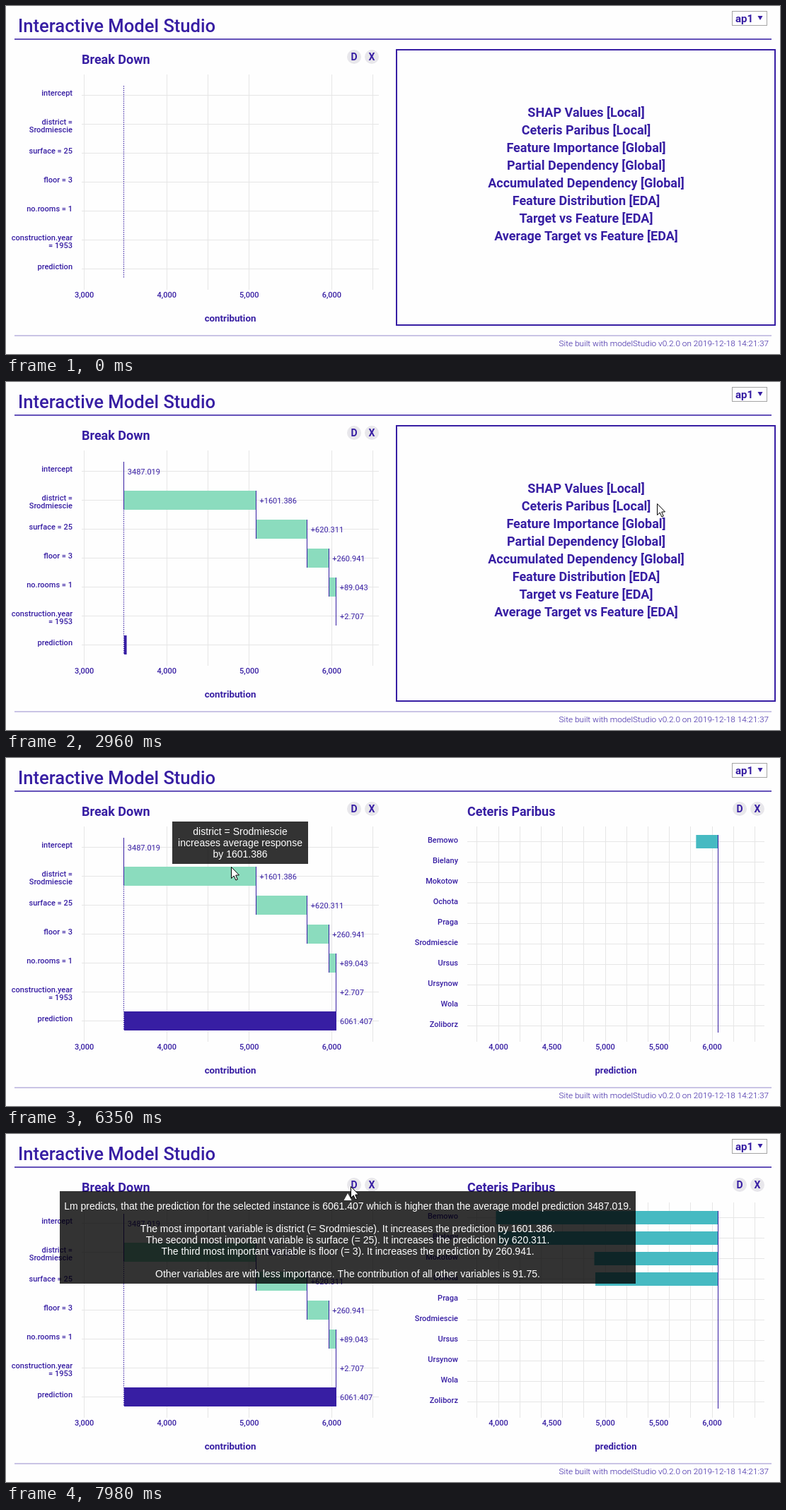
Recreate the animation shown at these times as an HTML page with a canvas. Size 1094 by 493 pixels, loop 8000 ms.

```html
<!DOCTYPE html>
<html lang="en">
<head>
<meta charset="utf-8">
<title>Interactive Model Studio</title>
<style>
html, body { margin: 0; width: 100%; height: 100%; overflow: hidden; background: #fefefe; }
canvas { display: block; }
</style>
</head>
<body>
<canvas id="stage" width="1094" height="493"></canvas>
<script>
const ctx = document.getElementById('stage').getContext('2d');
const LOOP = 8000, INK = '#371ea3', GREEN = '#8bdcbe', TEAL = '#46bac2', GRID = '#e6e6e6';
const MENU = ['SHAP Values [Local]', 'Ceteris Paribus [Local]', 'Feature Importance [Global]',
  'Partial Dependency [Global]', 'Accumulated Dependency [Global]', 'Feature Distribution [EDA]',
  'Target vs Feature [EDA]', 'Average Target vs Feature [EDA]'];
const ROWS = [['intercept'], ['district =', 'Srodmiescie'], ['surface = 25'], ['floor = 3'],
  ['no.rooms = 1'], ['construction.year', '= 1953'], ['prediction']];
const BASE = 3487.019, PREDICTION = 6061.407;
const STEPS = [1601.386, 620.311, 260.941, 89.043, 2.707];
const DISTRICTS = ['Bemowo', 'Bielany', 'Mokotow', 'Ochota', 'Praga', 'Srodmiescie',
  'Ursus', 'Ursynow', 'Wola', 'Zoliborz'];
const DISTRICT_LEFT = [692.5, 695, 831.5, 833];
const HOVER_TIP = ['district = Srodmiescie', 'increases average response', 'by 1601.386'];
const SUMMARY = [
  'Lm predicts, that the prediction for the selected instance is 6061.407 which is higher than the average model prediction 3487.019.',
  '',
  'The most important variable is district (= Srodmiescie). It increases the prediction by 1601.386.',
  'The second most important variable is surface (= 25). It increases the prediction by 620.311.',
  'The third most important variable is floor (= 3). It increases the prediction by 260.941.',
  '',
  'Other variables are with less importance. The contribution of all other variables is 91.75.'];
// pointer keyframes: time, x, y
const PATH = [[430, 1080, 77], [800, 1007, 105], [1100, 994, 109], [1620, 974, 127], [2440, 970, 136],
  [2960, 920, 172], [3300, 899, 176], [3380, 897, 177], [4230, 897, 177], [4470, 796, 191],
  [4850, 590, 165], [5280, 393, 118], [5480, 326, 164], [5570, 330, 158], [5890, 330, 158],
  [6010, 318, 154], [6650, 318, 154], [7000, 339, 131], [7150, 339, 131], [7720, 484, 76],
  [7900, 484, 74], [7980, 487, 74]];

const clamp = v => Math.max(0, Math.min(1, v));
const cubic = p => p < .5 ? 4 * p ** 3 : 1 - 4 * (1 - p) ** 3;
const progress = (t, start, span) => cubic(clamp((t - start) / span));
const num = v => v.toLocaleString('en-US');

function text(s, x, y, size = 11, weight = 500, align = 'left', color = INK, family = 'Roboto') {
  ctx.font = `${weight} ${size}px ${family}, sans-serif`;
  ctx.textAlign = align;
  ctx.fillStyle = color;
  ctx.fillText(s, x, y);
}
function rect(x, y, w, h, color) {
  ctx.fillStyle = color;
  ctx.fillRect(x, y, w, h);
}
function shape(points, fill, stroke) {
  ctx.beginPath();
  points.forEach(([x, y]) => ctx.lineTo(x, y));
  ctx.closePath();
  ctx.fillStyle = fill;
  ctx.fill();
  if (stroke) {
    ctx.strokeStyle = stroke;
    ctx.lineWidth = 1;
    ctx.stroke();
  }
}
function disc(x, y, r, color) {
  ctx.beginPath();
  ctx.arc(x, y, r, 0, 7);
  ctx.fillStyle = color;
  ctx.fill();
}
const hline = (x, y, w, color = GRID) => rect(x, Math.round(y), w, 1, color);
const vline = (x, y, h, color = GRID) => rect(Math.floor(x), y, 1, h, color);

function plotHead(title, x) {
  text(title, x, 82, 18, 700);
  [['D', 385], ['X', 410]].forEach(([s, dx]) => {
    disc(x + dx, 72, 10, '#e8e7eb');
    text(s, x + dx, 77, 14, 700, 'center');
  });
}

function page() {
  rect(0, 0, 1094, 493, '#fefefe');
  text('Interactive Model Studio', 17, 37, 25.6, 500);
  rect(12, 46, 1070, 2, '#6452b9');
  rect(12, 466, 1070, 2, '#c9c4e5');
  text('Site built with modelStudio v0.2.0 on 2019-12-18 14:21:37', 1078, 482, 11.8, 300, 'right');
  ctx.strokeStyle = '#a5a5a5';
  ctx.lineWidth = 1;
  ctx.strokeRect(1026.5, 7.5, 49, 20);
  text('ap1', 1031, 23, 15, 700);
  shape([[1062.5, 14], [1069.5, 14], [1066, 20]], INK);
}

function breakDown(t) {
  const START = -68, SPAN = 493;
  const scale = v => 110 + .1166 * (v - 3000);
  const done = i => t >= START + (i + 1) * SPAN;
  const grow = i => progress(t, START + i * SPAN, SPAN);
  const top = i => 113 + 41 * i;

  plotHead('Break Down', 107);
  [3000, 4000, 4500, 5000, 6000, 6500].forEach(v => vline(scale(v) + .4, 97, 305));
  ROWS.forEach((lines, i) => {
    hline(107, top(i) + 13, 420);
    lines.forEach((s, k) => text(s, 94, top(i) + 14 + 11 * k, 11, 500, 'right'));
  });
  [3000, 4000, 5000, 6000].forEach(v => text(num(v), scale(v) + .6, 413, 11, 500, 'center'));
  text('contribution', 317, 447, 13.3, 700, 'center');
  for (let y = 113; y < 385; y += 3) rect(166, y, 1, 1.5, INK);

  // Each connector drops to the next row while that row's bar grows.
  const connector = (i, x) => vline(x, top(i), 68 * grow(i + 1), INK);
  let from = BASE;
  if (done(0)) text('3487.019', scale(BASE) + 5, 131, 11, 400);
  STEPS.forEach((d, k) => {
    const i = k + 1, x = scale(from);
    rect(x, top(i), (scale(from + d) - x) * grow(i), 27, GREEN);
    from += d;
    if (done(i)) text('+' + d, scale(from) + 5, top(i) + 18, 11, 400);
  });
  rect(167, top(6), (scale(PREDICTION) - 167) * grow(6), 27, INK);
  if (done(6)) text(PREDICTION, scale(PREDICTION) + 5, top(6) + 18, 11, 400);
  from = BASE;
  [0, ...STEPS].forEach((d, i) => connector(i, scale(from += d)));
}

function menu() {
  ctx.strokeStyle = INK;
  ctx.lineWidth = 2;
  ctx.strokeRect(552, 62, 535, 390);
  MENU.forEach((s, i) => text(s, 820, 157 + 25 * i, 18, 700, 'center'));
}

function profile(t) {
  plotHead('Ceteris Paribus', 652);
  for (let i = 0; i < 14; i++) hline(652, 107 + 21.95 * i, 420);
  for (let i = 0; i < 5; i++) text(num(6000 - 500 * i), 649, 155 + 54.8 * i, 11, 500, 'right');
  ctx.save();
  ctx.translate(612, 262);
  ctx.rotate(-Math.PI / 2);
  text('prediction', 0, 0, 13, 700, 'center');
  ctx.restore();

  hline(662, 402, 401, INK);
  vline(662, 402, 6, INK);
  vline(1062, 402, 6, INK);
  [1920, 1940, 1960, 1980, 2010].forEach(v =>
    text(num(v), 662.5 + (v - 1920) * 400 / 90, 425, 11, 500, 'center'));
  rect(808, 392, 2, 10, '#f00');
  text('construction.year = 1953', 862, 447, 12.9, 700, 'center');

  const p = progress(t, 3670, 650);
  ctx.beginPath();
  ctx.moveTo(662, 143.3);
  ctx.lineTo(662 + 400 * p, 143.3 + 2.4 * p);
  ctx.strokeStyle = TEAL;
  ctx.lineWidth = 2;
  ctx.stroke();
  disc(808.7, 144.2, 3 * progress(t, 4490, 200), INK);
}

function districts(t) {
  const scale = v => 998 + .151 * (v - 6000);
  plotHead('Ceteris Paribus', 652);
  for (let v = 3800; v <= 6400; v += 200) vline(scale(v), 97, 305);
  DISTRICTS.forEach((s, i) => {
    hline(652, 118 + 29 * i, 420);
    text(s, 639, 119.5 + 29 * i, 11, 500, 'right');
  });
  DISTRICT_LEFT.forEach((left, i) => {
    const w = (1007 - left) * progress(t, 6225 + 430 * i, 430);
    rect(1007 - w, 109 + 29 * i, w, 19, TEAL);
  });
  vline(1006, 109, 280, INK);
  for (let v = 4000; v <= 6000; v += 500) text(num(v), scale(v), 413, 11, 500, 'center');
  text('prediction', 862, 447, 13, 700, 'center');
}

function tip(x, y, w, h, lines, firstLine) {
  rect(x, y, w, h, 'rgba(0,0,0,.8)');
  lines.forEach((s, i) =>
    text(s, x + w / 2, firstLine + 16 * i, 14, 400, 'center', '#fff', '"Liberation Sans", Arial'));
}

function pointer(t) {
  const k = PATH.findIndex(p => p[0] > t);
  if (k === 0) return;
  const b = PATH[k < 0 ? PATH.length - 1 : k], a = k < 0 ? b : PATH[k - 1];
  const f = a === b ? 0 : (t - a[0]) / (b[0] - a[0]);
  const x = Math.round(a[1] + (b[1] - a[1]) * f) + .5;
  const y = Math.round(a[2] + (b[2] - a[2]) * f) + .5;
  shape([[0, 0], [0, 16], [3.7, 12.5], [6.4, 18.5], [8.8, 17.5], [6.2, 11.6], [11, 11.4]]
    .map(([dx, dy]) => [x + dx, y + dy]), '#fff', '#000');
}

function draw() {
  const t = performance.now() % LOOP;
  page();
  breakDown(t);
  if (t < 3670) menu();
  else if (t < 6250) profile(t);
  else districts(t);
  if (t >= 5450 && t < 6700) tip(235, 90, 192, 60, HOVER_TIP, 109);
  if (t >= 7740) {
    tip(76, 81, 814, 131, SUMMARY, 107);
    shape([[477.5, 94], [488.5, 94], [483, 84]], '#fff');
  }
  pointer(t);
  requestAnimationFrame(draw);
}
draw();
</script>
</body>
</html>
```
